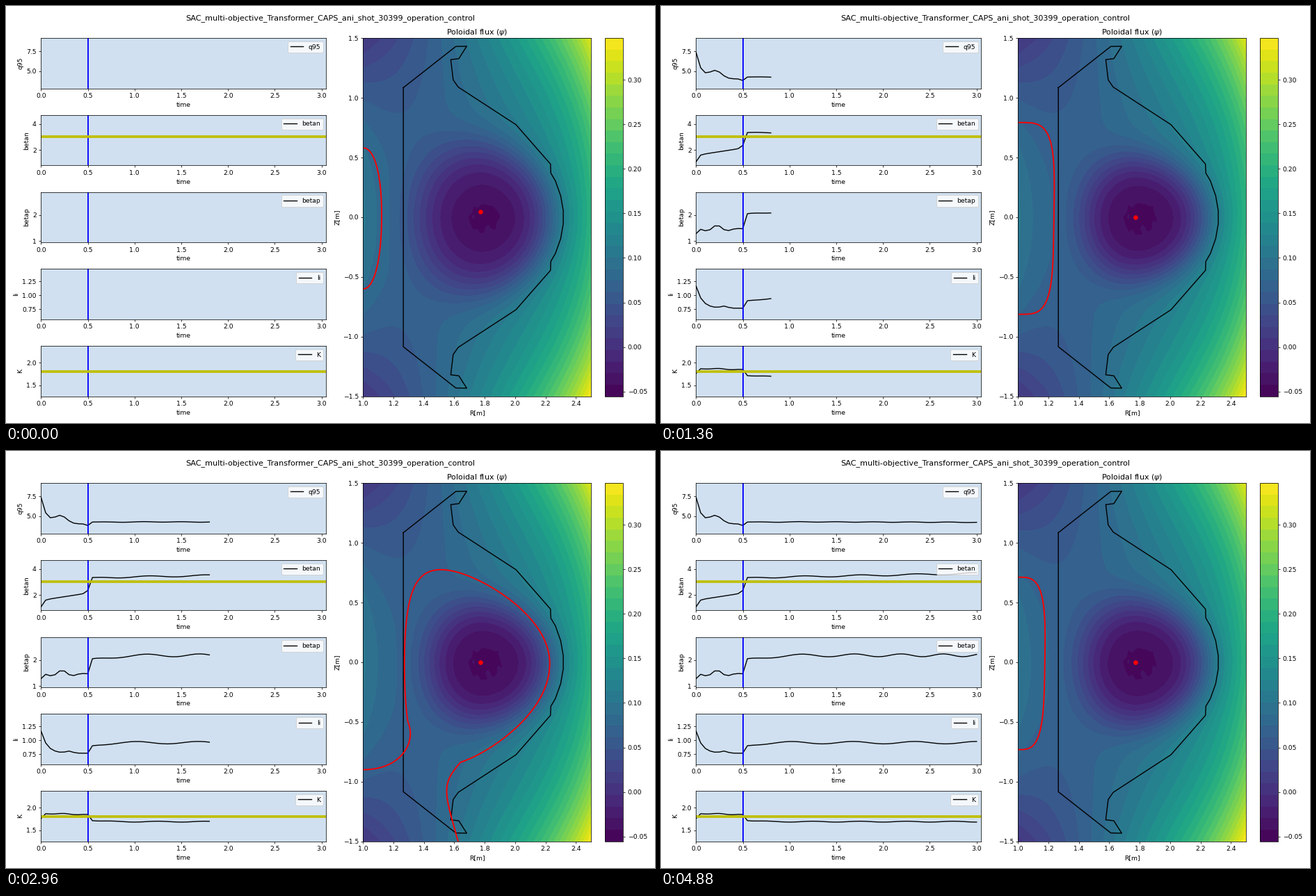
A matplotlib script for the animation above (4960 ms loop, 933 by 600 pixels).

```python
import numpy as np
import matplotlib.pyplot as plt
from matplotlib.animation import FuncAnimation
from matplotlib.cm import ScalarMappable
from matplotlib.colors import Normalize

DPI = 66.667
W, H = 14 * DPI, 9 * DPI
FRAMES, INTERVAL = 62, 80
STEP = 0.05

fig = plt.figure(figsize=(14, 9), dpi=DPI)
fig.suptitle("SAC_multi-objective_Transformer_CAPS_ani_shot_30399_operation_control")


def axes_at(x0, y0, x1, y1):
    """Axes from a pixel box measured from the top left corner."""
    return fig.add_axes([x0 / W, 1 - y1 / H, (x1 - x0) / W, (y1 - y0) / H])


def bump(t, mid, width):
    return np.exp(-((t - mid) / width) ** 2)


def wave(t, peak, period):
    return np.cos(2 * np.pi * (t - peak) / period)


# ---- time traces: settling start, then the controlled phase ----
time = np.arange(61) * STEP
t0, t1 = time[:11], time[11:]
s = t1 - t1[0]

q95 = np.r_[4.05 + 3.35 * np.exp(-t0 / .055) + bump(t0, .21, .09) - .2 * bump(t0, .5, .03),
            4.32 - .03 * s - .05 * bump(t1, .75, .2) + .03 * wave(t1, 1.1, .4)]
betan = np.r_[1.6 + 1.1 * t0 - .5 * np.exp(-t0 / .02) + .2 * bump(t0, .5, .03),
              3.33 + .13 * s + .06 * wave(t1, 1.15, .6) - .05 * bump(t1, .55, .1)]
chirp = 1.65 * (t1 - 1.13) + .22 * (t1 - 1.13) ** 2
betap = np.r_[1.47 - .2 * np.exp(-t0 / .015) + .14 * wave(t0, .225, .25) * bump(t0, .22, .15),
              2.18 - .17 * np.exp(-s / .2) + .055 * np.cos(2 * np.pi * chirp)]
li = np.r_[.765 + .4 * np.exp(-t0 / .065) + .035 * bump(t0, .3, .05),
           .955 - .05 * np.exp(-s / .12) + .022 * wave(t1, 1.68, .66)]
kappa = np.r_[1.87 - .12 * np.exp(-t0 / .015) + .01 * wave(t0, .24, .25) - .12 * t0 ** 2,
              1.69 + .03 * np.exp(-s / .1) + .01 * wave(t1, 1.25, .5)]

# name, values, y limits, y ticks, reference value
PANELS = [
    ("q95", q95, (2.85, 9.17), (5.0, 7.5), None),
    ("betan", betan, (0.83, 4.67), (2, 4), 3.0),
    ("betap", betap, (0.95, 2.88), (1, 2), None),
    ("li", li, (0.565, 1.47), (0.75, 1.0, 1.25), None),
    ("K", kappa, (1.254, 2.37), (1.5, 2.0), 1.8),
]

lines = []
for n, (name, values, ylim, ticks, ref) in enumerate(PANELS):
    top = 46.2 + 110.75 * n
    ax = axes_at(50.3, top, 460.4, top + 72.4)
    ax.set_facecolor("#d0e0f0")
    line, = ax.plot([], [], "k", lw=1.5, label=name)
    lines.append(line)
    ax.axvline(0.5, color="b", lw=2)
    if ref is not None:
        ax.axhline(ref, color="y", lw=4)
    ax.set_xlabel("time")
    ax.set_ylabel(name)
    ax.set_xticks(np.arange(0, 3.1, 0.5))
    ax.set_yticks(ticks)
    ax.set_xlim(0, 3.05)
    ax.set_ylim(*ylim)
    ax.legend(loc="upper right")

# ---- poloidal flux ----
LO, HI = -0.0555, 0.347
LEVELS = np.linspace(LO, HI, 32)
R, Z = np.meshgrid(np.linspace(1, 2.5, 65), np.linspace(-1.5, 1.5, 65))
speckle = np.abs(np.random.default_rng(4).normal(size=R.shape)) * 0.0018


def vacuum(r, z):
    """Saddle-shaped background field."""
    u = r - 1.4
    ridge = 0.071 + u ** 2 * (0.119 - 0.151 * u + 0.129 * u ** 2)
    bend = 0.058 * (r - 1.47) - 0.016 * np.exp(-(r - 1) / 0.15)
    return ridge + bend * z ** 2 - 0.004 * z * (r - 1)


def flux(k):
    wide = max(0, np.cos(2 * np.pi * k / 51)) ** 2
    drift = -0.015 * wide * k / 51
    size = 1 + 0.19 * wide

    dz = Z + 0.01
    dr = R - 1.8 + 0.12 * dz ** 2
    rho = np.hypot(dr / np.where(dr > 0, 0.44, 0.385 * size), dz / (0.525 * size))
    well = np.exp(-rho ** 3.6)

    centre = np.exp(-(np.hypot(R - 1.8, dz) / 0.18) ** 4)
    core = -0.0415 + 0.005 * wide + centre * (speckle - 0.004 - 0.005 * wide)
    outer = vacuum(R, Z) + drift * (1 - 1.15 * (R - 1))
    return np.clip(outer * (1 - well) + core * well, LO + 1e-4, HI - 1e-4)


# ---- plasma boundary ----
def bulge(width, half, n, tilt):
    """Open superellipse attached to the left edge."""
    a = np.linspace(-np.pi / 2, np.pi / 2, 121)
    y = np.sign(a) * np.abs(np.sin(a)) ** (2 / n)
    return 1 + width * np.cos(a) ** (2 / n) * (1 + tilt * y), half * y - 0.01


def d_shape(start, end, r0, a, z0, up, down):
    """D-shaped arc between two poloidal angles."""
    th = np.linspace(start, end, 160)
    sin = np.sin(th)
    return r0 + a * np.cos(th + 0.52 * sin), z0 + sin * np.where(sin > 0, up, down)


def leg(*points):
    """Smooth open path through a few points."""
    x, y = np.array(points).T
    knots = np.arange(len(x))
    t = np.linspace(0, knots[-1], 60)
    return [np.polyval(np.polyfit(knots, v, len(x) - 1), t) for v in (x, y)]


def join(*parts):
    return np.hstack([np.array(p) for p in parts])


lower_leg = leg((1.625, -1.5), (1.562, -1.2), (1.555, -1.02), (1.62, -0.87))
upper_leg = leg((1.62, 0.765), (1.47, 0.83), (1.465, 1.04), (1.55, 1.5))
left_leg = leg((1.295, -0.5), (1.3, -0.68), (1.2, -0.835), (1.0, -0.9))

both_legs = join(lower_leg, d_shape(-1.3, 1.27, 1.74, 0.49, -0.01, 0.8, 0.86), upper_leg)
one_leg = join(lower_leg, d_shape(-1.3, np.pi + 0.55, 1.75, 0.478, -0.01, 0.785, 0.86),
               left_leg)

# frame around which each boundary holds
BOUNDARIES = {
    0: bulge(0.122, 0.59, 2.2, 0.03),
    6: d_shape(0, 2 * np.pi, 1.74, 0.45, -0.06, 0.73, 0.74),
    17: bulge(0.236, 0.803, 4, 0.04),
    29: both_legs,
    37: one_leg,
    51: bulge(0.127, 0.588, 2.2, 0.03),
    61: bulge(0.176, 0.722, 3.5, 0.05),
}

# ---- flux panel ----
ax = axes_at(513.3, 46.2, 841.1, 561.6)
ax.set_title(r"Poloidal flux ($\psi$)")
ax.set_xlabel("R[m]")
ax.set_ylabel("Z[m]")

upper = [(1.265, 1.085), (1.61, 1.43), (1.682, 1.432), (1.63, 1.328), (1.577, 1.32),
         (1.593, 1.15), (1.626, 1.09), (2.006, .775), (2.233, .445), (2.235, .37),
         (2.265, .305), (2.3, .18), (2.317, .055)]
wall = np.array(upper + [(r, -z) for r, z in upper[::-1]] + upper[:1])
ax.plot(*wall.T, "k", lw=1.5)
boundary, = ax.plot([], [], "r", lw=2)
axis_dot, = ax.plot([], [], "ro", ms=6)
ax.set_xticks(np.arange(1, 2.5, 0.2))
ax.set_yticks(np.arange(-1.5, 1.6, 0.5))
ax.set_xlim(1, 2.5)
ax.set_ylim(-1.5, 1.5)

bar = fig.colorbar(ScalarMappable(Normalize(LO, HI), "viridis"),
                   cax=axes_at(861.4, 46.2, 887.2, 561.6),
                   boundaries=LEVELS, values=(LEVELS[1:] + LEVELS[:-1]) / 2,
                   spacing="proportional", ticks=np.arange(-1, 7) * 0.05)
bar.minorticks_off()

filled = []


def draw(k):
    for line, panel in zip(lines, PANELS):
        line.set_data(time[:k], panel[1][:k])
    while filled:
        filled.pop().remove()
    filled.append(ax.contourf(R, Z, flux(k), levels=LEVELS, cmap="viridis",
                              zorder=0.5))
    nearest = min(BOUNDARIES, key=lambda key: abs(key - k))
    boundary.set_data(*BOUNDARIES[nearest])
    axis_dot.set_data([1.773], [0.045 if k == 0 else 0.0])
    return []


anim = FuncAnimation(fig, draw, frames=FRAMES, interval=INTERVAL, repeat=True)
plt.show()
```
